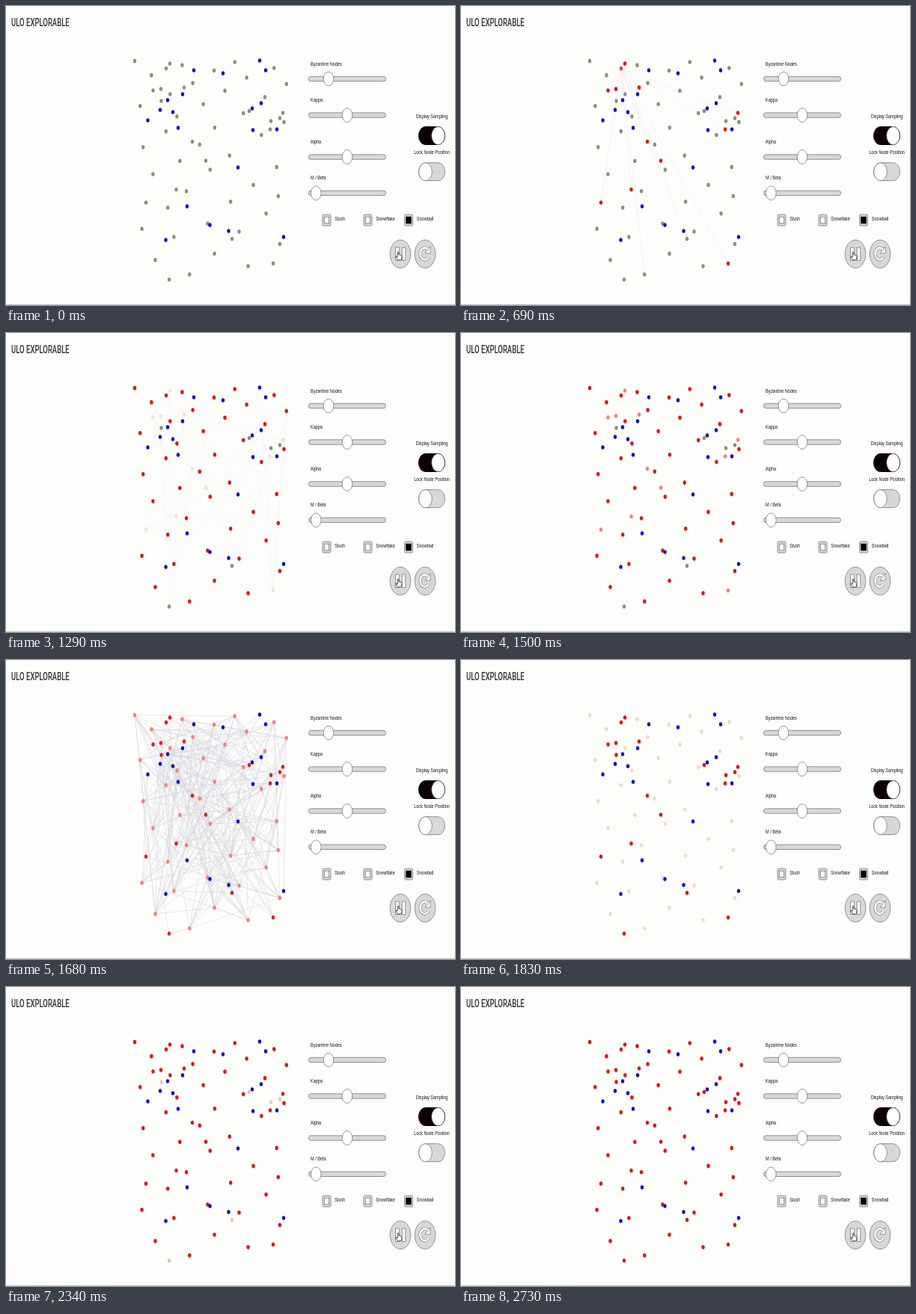
An HTML page for the animation above (2760 ms loop, 600 by 400 pixels).

```html
<!DOCTYPE html>
<html lang="en">
<head>
<meta charset="utf-8">
<title>Explorable</title>
<style>
html, body { margin: 0; width: 100%; height: 100%; overflow: hidden; background: #fdfdfc; }
svg { display: block; width: 100vw; height: 100vh; }
text { font-family: "Liberation Sans", Arial, sans-serif; font-size: 7.2px; fill: #161616; }
.title { font-family: Roboto, sans-serif; font-size: 14px; font-weight: 500; fill: #333; }
.bar { fill: #d8d8d6; stroke: #6c6c6c; stroke-width: .7; }
.knob { fill: #fff; stroke: #6c6c6c; stroke-width: .7; }
.on { fill: #0c0204; stroke: #0c0204; }
.links { fill: none; stroke: #d2d2da; stroke-width: .5; }
</style>
</head>
<body>
<svg id="stage" viewBox="0 0 600 400" preserveAspectRatio="none">
  <rect width="600" height="400" fill="#fdfdfc"/>
  <rect y="399" width="600" height="1" fill="#c4c4c2"/>
  <g id="net"></g>
  <g id="ui"></g>
</svg>
<script>
const LOOP = 2760, STEP = 475, FIRST_ASK = 665;
const GRAY = [142, 142, 122], RED = [228, 18, 14], PALE = [255, 223, 200];

let state = 11;
const rand = () => (state = (state * 16807) % 2147483647) / 2147483647;

// Even spread over the field, denser towards the top
const scatter = n => Array.from({ length: n }, (_, i) => [
  172 + 208 * ((i * .618 + .08 * rand()) % 1),
  73 + 290 * ((i + rand()) / n) ** 1.35
]);

const byzantine = [[339,73],[251,86],[290,90],[347,86],[236,118],[216,126],[206,139],[223,142],
  [341,130],[329,137],[330,166],[362,165],[189.5,153],[230,163],[310,216],[242,268],
  [272.5,293],[297.5,301],[371,309],[213.5,313]];
const seed = [[214,83.5]];
const first = [[219,77],[196.5,113],[207,111],[238,109],[370,143],[353,165],[249,181.5],
  [267,207],[227.5,245.5],[187,263],[357,344.5]];
const last = [[207.5,127],[325,140.5],[354,154],[366,150],[302,311.5],[218,366]];
const second = scatter(42);
const all = [...byzantine, ...seed, ...first, ...second, ...last];

const clamp = v => Math.max(0, Math.min(1, v));
const mix = (a, b, k) => a.map((v, i) => v + (b[i] - v) * k);
const rgb = c => `rgb(${c.map(Math.round)})`;

function add(parent, tag, attrs, text) {
  const el = document.createElementNS("http://www.w3.org/2000/svg", tag);
  for (const k in attrs) el.setAttribute(k, attrs[k]);
  if (text) el.textContent = text;
  return parent.appendChild(el);
}

const pick = n => Array.from({ length: n }, () => all[Math.floor(rand() * all.length)]);
const linkPath = (nodes, peers) =>
  nodes.map(p => peers().map(q => `M${p}L${q}`).join("")).join("");

const net = document.getElementById("net");
const dot = ([x, y], fill) => add(net, "ellipse", { cx: x, cy: y, rx: 2.2, ry: 2.8, fill });

// Each wave turns red (hit, fade), then samples its peers one step after the wave before
const waves = [
  { nodes: seed, hit: 30, fade: 470, peers: () => [...first, ...pick(4)] },
  { nodes: first, hit: 615, fade: 50, peers: () => pick(16) },
  { nodes: second, hit: 1160, fade: 60, peers: () => pick(8) },
  { nodes: last, hit: 1630, fade: 60, peers: () => pick(20) }
];
waves.forEach((w, i) => {
  w.ask = FIRST_ASK + i * STEP;
  w.links = add(net, "path", { class: "links", d: linkPath(w.nodes, w.peers) });
});
for (const w of waves) w.dots = w.nodes.map(p => dot(p, rgb(GRAY)));
byzantine.forEach(p => dot(p, "#0c0cd8"));

const ui = document.getElementById("ui");
const label = (x, y, text, anchor = "start") =>
  add(ui, "text", { transform: `translate(${x} ${y}) scale(.77 1)`, "text-anchor": anchor }, text);
const knob = (cx, cy, rx, ry) => add(ui, "ellipse", { class: "knob", cx, cy, rx, ry });
const box = (cls, x, y, width, height, rx = 0, ry = rx) =>
  add(ui, "rect", { class: cls, x, y, width, height, rx, ry });

function slider(text, y, x) {
  label(407, y - 18, text);
  box("bar", 404.5, y - 3.2, 103, 6.4, 2.6, 3.2);
  knob(x, y, 6.8, 9.4);
}
function toggle(text, y, on) {
  label(569, y - 24, text, "middle");
  box(on ? "on" : "bar", 551.5, y - 12, 35, 24, 9, 12);
  knob(on ? 577.5 : 560.5, y, 8.8, 12);
}
function check(text, x, on) {
  box("bar", x - 5.5, 279, 11, 15, 1.5);
  box(on ? "on" : "knob", x - 3.2, 282.2, 6.4, 8.6);
  label(x + 10.8, 286.8, text);
}

add(ui, "text", { class: "title", transform: "translate(7 26.6) scale(.68 1)" }, "ULO EXPLORABLE");
slider("Byzantine Nodes", 97.5, 431);
slider("Kappa", 146, 456);
slider("Alpha", 202, 456);
slider("M / Beta", 250.3, 414.3);
toggle("Display Sampling", 173.5, true);
toggle("Lock Node Position", 221.7, false);
check("Slush", 428.5, false);
check("Snowflake", 483.5, false);
check("Snowball", 538, true);

for (const cx of [527, 560])
  add(ui, "ellipse", { class: "bar", cx, cy: 331.8, rx: 13.8, ry: 18.8 });
for (const x of [520.6, 529.2]) box("knob", x, 323, 4.6, 17.5);

const arc = "M564.6 335.5A6 8 0 1 1 563.6 325.6";
add(ui, "path", { d: arc, fill: "none", stroke: "#808080", "stroke-width": 4 });
add(ui, "path", { class: "knob", d: "M567 321.5V331H560Z" });
add(ui, "path", { d: arc, fill: "none", stroke: "#fff", "stroke-width": 2.6 });

// Hand pointer over the pause button
add(ui, "path", {
  d: "M523.2 334V329.5Q524 328 524.8 329.5V332.6L528.4 333.6Q529.2 334 529 335.4L528.2 339.8H523.6L521 336Q520.6 334.6 521.8 334.8L523.2 336Z",
  fill: "#fff", stroke: "#222", "stroke-width": .8, "stroke-linejoin": "round"
});

function draw(t) {
  for (const w of waves) {
    const age = t - w.ask;
    const base = mix(GRAY, RED, clamp((t - w.hit) / w.fade));
    const shade = Math.min(clamp(age / 120), clamp((560 - age) / 360));
    const fill = rgb(mix(base, PALE, shade));
    w.dots.forEach(d => d.setAttribute("fill", fill));
    w.links.setAttribute("opacity", Math.min(clamp(age / 60), clamp((160 - age) / 90)));
  }
}

const start = performance.now();
function tick() {
  draw((performance.now() - start) % LOOP);
  requestAnimationFrame(tick);
}
draw(0);
requestAnimationFrame(tick);
</script>
</body>
</html>
```
